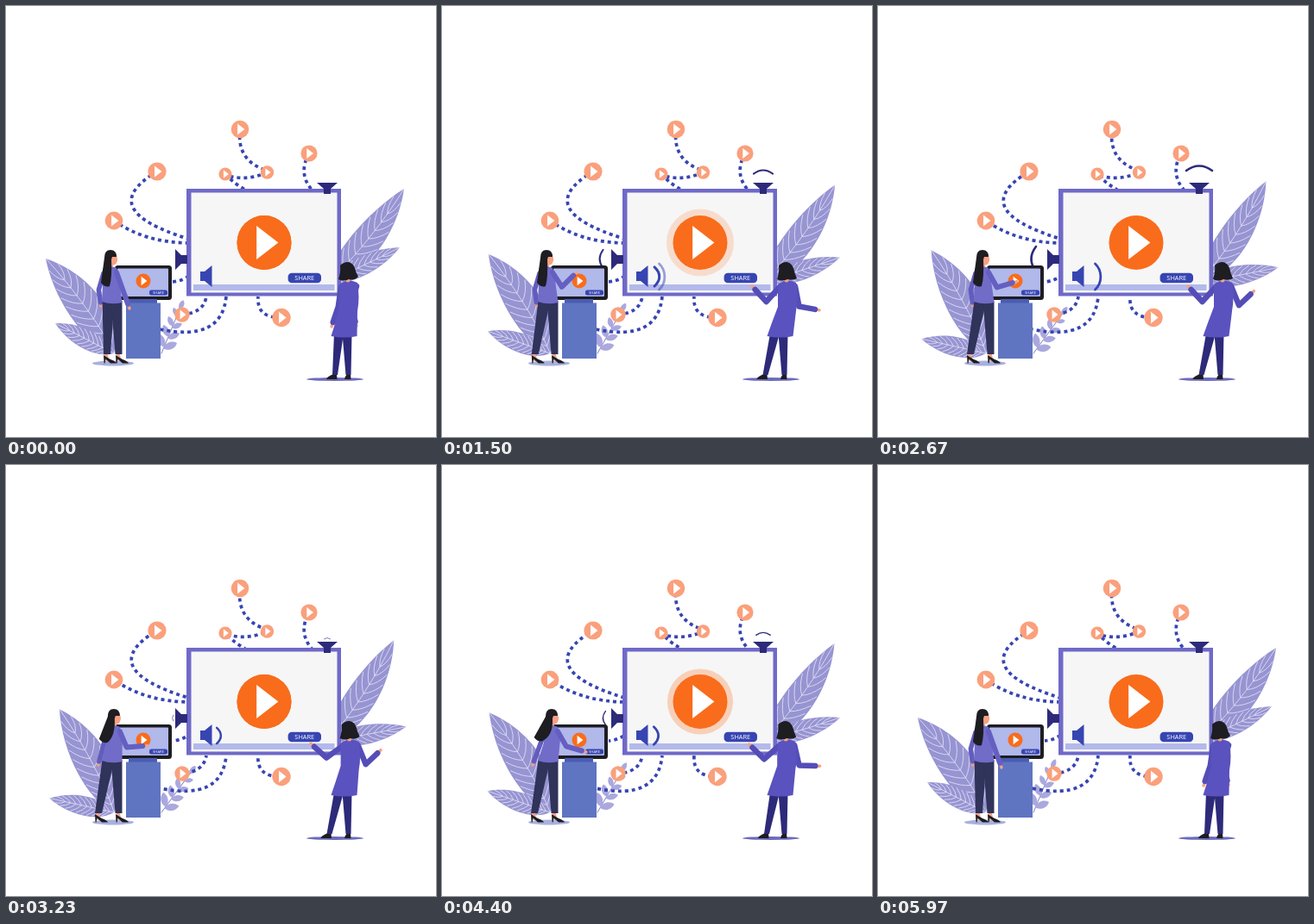
Recreate the animation shown at these times as an HTML page. Size 498x500 px, loop 6.01 s.

```html
<!DOCTYPE html>
<html lang="en">
<head>
<meta charset="utf-8">
<title>Video sharing</title>
<style>
html, body { margin: 0; width: 100%; height: 100%; overflow: hidden; background: #fff; }
svg { display: block; width: 498px; height: 500px; }
text { font-family: "Open Sans", sans-serif; fill: #fff; text-anchor: middle; }
</style>
</head>
<body>
<svg id="stage" viewBox="0 0 498 500" xmlns="http://www.w3.org/2000/svg"></svg>
<script>
const LOOP = 6010;
const BLUE = '#3745b2', NAVY = '#2d2a7a', BLACK = '#1d1d22', ORANGE = '#f96c1b', SKIN = '#f7a182';
const stage = document.getElementById('stage');

const ramp = (v, a, b) => Math.min(1, Math.max(0, (v - a) / (b - a)));
const ease = (v, a, b) => { const u = ramp(v, a, b); return u * u * (3 - 2 * u); };
const hold = (t, a, b, c, d) => ease(t, a, b) * (1 - ease(t, c, d));
const mix = (a, b, k) => a + (b - a) * k;
const mixPoint = (p, q, k) => [mix(p[0], q[0], k), mix(p[1], q[1], k)];
const scaleAt = (x, y, s) => `translate(${x} ${y}) scale(${s}) translate(${-x} ${-y})`;
const path = (d, fill) => `<path d="${d}" fill="${fill}"/>`;
const line = (d, color, width) =>
  `<path d="${d}" fill="none" stroke="${color}" stroke-width="${width}" stroke-linecap="round" stroke-linejoin="round"/>`;

function playButton(x, y, r, color) {
  return `<circle cx="${x}" cy="${y}" r="${r}" fill="${color}"/>` +
    path(`M${x - r * .28} ${y - r * .62}L${x + r * .52} ${y}L${x - r * .28} ${y + r * .62}Z`, '#fff');
}

function shareButton(x, y, w, h, size) {
  return `<rect x="${x - w / 2}" y="${y - h / 2}" width="${w}" height="${h}" rx="${h * .38}" fill="${BLUE}"/>` +
    `<text x="${x}" y="${y + size * .36}" font-size="${size}">SHARE</text>`;
}

// Grows from its base toward -y; veins end on the curved outline.
function leafShape(len, width, bend) {
  const bez = (u, a, b, c) => 3 * u * (1 - u) ** 2 * a + 3 * u * u * (1 - u) * b + u ** 3 * c;
  const at = (u, side) => [bez(u, side + bend, side + bend, 0), -len * bez(u, .2, .66, 1)];
  const curve = side => `C${side + bend} ${-len * .2} ${side + bend} ${-len * .66} 0 ${-len}`;
  let veins = 'M0 0' + curve(0);
  for (let u = .1; u < .8; u += .075) {
    for (const side of [-width, width]) {
      veins += `M${at(u, 0)}Q${at(u + .04, side * .5)} ${at(u + .13, side * .92)}`;
    }
  }
  const back = `C${width + bend} ${-len * .66} ${width + bend} ${-len * .2} 0 0Z`;
  return path('M0 0' + curve(-width) + back, '#9794d2') +
    `<path d="${veins}" fill="none" stroke="#e4e3f6" stroke-width=".75"/>`;
}

function sprigShape() {
  const leaf = (y, angle, s) =>
    `<path transform="translate(0 ${y}) rotate(${angle}) scale(${s})" d="M0 0C-6 -5 -5 -13 0 -17C5 -13 6 -5 0 0" fill="#aaa8de"/>`;
  let out = line('M0 0V-60', '#8e8bcd', 1);
  for (let i = 0; i < 4; i++) {
    out += leaf(-8 - i * 13, -45, 1 - i * .13) + leaf(-6 - i * 13, 45, 1 - i * .13);
  }
  return out + leaf(-55, 0, .7);
}

const plants = [
  { base: [125, 403], tip: [46, 293], swing: 8, width: 27, bend: 6 },
  { base: [125, 403], tip: [57, 368], swing: -15, width: 15, bend: 0 },
  { base: [370, 322], tip: [461, 212], swing: -6, width: 23, bend: 7 },
  { base: [372, 320], tip: [456, 280], swing: 15.5, width: 15, bend: 1 },
  { base: [180, 403], tip: [206, 340], swing: 14 }
];
for (const p of plants) {
  const dx = p.tip[0] - p.base[0], dy = p.tip[1] - p.base[1];
  p.angle = Math.atan2(dx, -dy) * 180 / Math.PI;
  p.shape = p.width ? leafShape(Math.hypot(dx, dy), p.width, p.bend) : sprigShape();
}

// Every floating button hangs on one dotted curve.
const floats = [
  { x: 271, y: 143, r: 10.3, trail: 'Q267 177 297 189' },
  { x: 351, y: 171, r: 9.6, trail: 'Q338 194 354 213' },
  { x: 175, y: 192, r: 10.6, trail: 'Q101 236 211 270' },
  { x: 125, y: 249, r: 10.4, trail: 'Q160 274 211 275' },
  { x: 254, y: 195, r: 7.6, trail: 'Q264 206 277 213' },
  { x: 302.5, y: 193, r: 7.7, trail: 'Q278 204 254 196' },
  { x: 204, y: 358, r: 8.7, trail: 'Q229 356 232 337' },
  { x: 319, y: 361.5, r: 10.7, trail: 'Q290 362 292 337' }
];
const cables = 'M255 337Q250 390 178 375M193 320Q204 319 212 313';

stage.innerHTML = `
<rect width="498" height="500" fill="#fff"/>
${plants.map(p => `<g class="plant">${p.shape}</g>`).join('')}
<path id="trails" d="${floats.map(f => `M${f.x} ${f.y}${f.trail}`).join('') + cables}"
  fill="none" stroke="${BLUE}" stroke-width="3.7" stroke-dasharray="4 4"/>
${floats.map(f => playButton(f.x, f.y, f.r, '#faa07c')).join('')}
<rect x="209" y="212" width="179" height="124.5" fill="#6f69c8"/>
<rect x="214.5" y="216.5" width="169" height="116" fill="#f6f6f6"/>
<rect x="217" y="323" width="163.5" height="7" fill="#b3b9ea"/>
${path('M196 282L203 289H210V299H203L196 306Z', NAVY)}
${path('M360 205H384L376 212V218H368V212Z', NAVY)}
<g id="topBeam">${line('M357 191Q372 180 387 191', NAVY, 2.6)}</g>
<g id="sideBeam">${line('M183 279Q172 293.5 183 308', NAVY, 2.6)}</g>
<circle id="halo" cx="299" cy="274.5" fill="${ORANGE}"/>
${playButton(299, 274.5, 31.5, ORANGE)}
${path('M225 308H230L238.5 301V326L230 319H225Z', BLUE)}
<g id="innerWave">${line('M243 306C248.500 311 248.500 317 243 322', BLUE, 2.2)}</g>
<g id="outerWave">${line('M251.500 299C260 307 260 321 251.500 329', BLUE, 2.8)}</g>
<g id="share">${shareButton(345.8, 315.5, 38.4, 11.5, 7.4)}</g>
<rect x="126" y="301" width="66" height="40" rx="3.5" fill="${BLACK}"/>
<rect x="129" y="304.5" width="59" height="32.5" rx="1" fill="#b1b8ea"/>
${playButton(159, 319, 8.5, ORANGE)}
${shareButton(176.5, 332.6, 21, 6, 4.2)}
<rect x="142" y="340" width="33" height="5" fill="#4a5db2"/>
<rect x="139" y="344.5" width="40" height="64.5" fill="#5f75c1"/>
<ellipse cx="124" cy="414.5" rx="24" ry="3" fill="#a9b0de"/>
<ellipse cx="381" cy="433" rx="33" ry="2" fill="#6d6bbc"/>
<g id="presenter"></g>
<g id="viewer"></g>`;

const get = id => document.getElementById(id);
const set = (id, name, value) => get(id).setAttribute(name, value);
const plantNodes = document.querySelectorAll('.plant');

// Two-bone arm: the elbow follows from the shoulder and the hand.
function arm(shoulder, hand, upper, lower, side, color, width) {
  const dx = hand[0] - shoulder[0], dy = hand[1] - shoulder[1], dist = Math.hypot(dx, dy);
  const along = Math.min(upper, (upper ** 2 - lower ** 2 + dist ** 2) / (2 * dist));
  const out = side * Math.sqrt(Math.max(0, upper ** 2 - along ** 2));
  const elbow = [shoulder[0] + (dx * along - dy * out) / dist, shoulder[1] + (dy * along + dx * out) / dist];
  const cuff = mixPoint(elbow, hand, .78);
  return line(`M${cuff}L${hand}`, SKIN, 3.4) + line(`M${shoulder}L${elbow}L${cuff}`, color, width);
}

const leg = (x, y, w, fx, fy, fw, color) =>
  path(`M${x - w / 2} ${y}H${x + w / 2}L${fx + fw / 2} ${fy}H${fx - fw / 2}Z`, color);

const heel = (x, y) =>
  line(`M${x + 3} ${y - 4}l1 6`, SKIN, 4) +
  path(`M${x} ${y - 3}l.6 9.5h1l.8 -5l5.6 5h7q-1 -2.500 -7 -4.500l-5 -3z`, BLACK);

function drawPresenter(t) {
  const lean = hold(t, 2700, 3700, 3900, 5970);
  const step = hold(t, 0, 1800, 5000, 5950);
  const x = 121 + 7 * lean, y = 292, foot = 113 - 10 * step;
  const hairX = 115 - 4 * lean, hairY = 325 - 6 * lean;
  const touch = mixPoint([155, 307], [167, 333], ease(t, 900, 4500));
  const frontHand = mixPoint([143, 351], touch, hold(t, 0, 600, 5100, 5900));
  const trousers = '#30335a';
  return heel(foot, 408) + heel(127, 408) +
    arm([x - 8, 310], [110 - 6 * lean, 348], 20, 19, 1, '#625dbd', 5.5) +
    leg(118.5, 342, 14, foot + 4, 404, 8, trousers) +
    leg(128, 342, 13, 130.5, 404, 8, trousers) +
    line(`M${x + 1} ${y + 5}L${x} 304`, SKIN, 5) +
    `<ellipse cx="${x + 3.5}" cy="${y + 2}" rx="4.6" ry="6.5" fill="${SKIN}"/>` +
    path(`M${x - 9} 305Q${x} 300 ${x + 7} 304L${x + 10} 318L134.500 344Q122 347 111 343L${x - 9} 322Z`, '#716cc8') +
    path(`M${x + 7} ${y - 1}Q${x + 7} ${y - 9} ${x} ${y - 9}Q${x - 7} ${y - 9} ${x - 7} ${y}L${hairX - 5} ${hairY - 4}Q${hairX} ${hairY + 2} ${hairX + 5} ${hairY}Q${x + 2} 314 ${x + 1} ${y + 2}L${x + 2} ${y - 1}Z`, BLACK) +
    arm([x + 7, 309], frontHand, 20, 24, 1, '#655fc2', 6);
}

function drawViewer(t) {
  const press = hold(t, 2900, 3600, 3800, 4700);
  const turn = Math.max(1 - ease(t, 0, 600), press, ease(t, 5200, 5900));
  const step = hold(t, 300, 1500, 3900, 5500);
  const x = 399 - 3 * turn, y = 308, foot = 377 - 6.5 * step;
  const pointing = [359 - 13 * press, 325 - 4 * press];
  const leftHand = mixPoint([377, 372], pointing, hold(t, 0, 930, 5070, 5930));
  const raise = hold(t, 630, 2200, 4000, 5000);
  const swing = 1.36 * raise, reach = 46 - 19 * raise ** 2;
  const rightHand = [x + 10 + Math.sin(swing) * reach, 325 + Math.cos(swing) * reach];
  const coat = '#5a52be', sleeve = '#554db7';
  const shoe = (sx, w) => path(`M${sx - w} 433Q${sx - w} 430.500 ${sx} 427h4l.5 6z`, BLACK);
  return shoe(foot + 2, 8) + shoe(395, 3) +
    leg(385.5, 380, 11, foot + 4, 428, 6, NAVY) + leg(395, 380, 11, 396.5, 428, 6, NAVY) +
    arm([x + 10, 325], rightHand, 24, 24, 1, sleeve, 6.5) +
    arm([x - 8, 326], leftHand, 23, 24.5, -1, sleeve, 6.5) +
    path(`M${x - 10} 323Q${x} 315 ${x + 11} 321Q${x + 14} 338 ${x + 11} 354L406.500 383Q392 386 376.500 383Q382 367 ${x - 10} 349Z`, coat) +
    line(`M${x} ${y + 6}V318`, SKIN, 5) +
    path(`M${x - 11} ${y + 9}Q${x - 8} ${y} ${x - 9} ${y - 7}Q${x - 5} ${y - 11} ${x} ${y - 11}Q${x + 6} ${y - 10} ${x + 8} ${y - 4}Q${x + 9} ${y + 1} ${x + 12} ${y + 8 - 2 * turn}Q${x + 7} ${y + 11} ${x + 1} ${y + 9}Q${x - 5} ${y + 12} ${x - 11} ${y + 9}Z`, BLACK);
}

function render(t) {
  const sway = (1 - Math.cos(2 * Math.PI * t / LOOP)) / 2;
  plants.forEach((p, i) => plantNodes[i].setAttribute('transform',
    `translate(${p.base}) rotate(${p.angle + p.swing * sway})`));
  set('trails', 'stroke-dashoffset', -96 * t / LOOP);

  const beat = t % (LOOP / 6);
  set('innerWave', 'transform', scaleAt(235, 314, 1 + .38 * ramp(beat, 60, 500)));
  set('innerWave', 'opacity', ramp(beat, 20, 130) * (1 - ramp(beat, 560, 650)));
  set('outerWave', 'opacity', ramp(beat, 450, 550) * (1 - ramp(beat, 670, 755)));
  const grow = ramp(beat, 100, 640);
  const beamAlpha = ramp(beat, 100, 200) * (1 - ramp(beat, 675, 715));
  set('topBeam', 'transform', scaleAt(372, 205, grow));
  set('sideBeam', 'transform', scaleAt(197, 293.5, grow));
  set('topBeam', 'opacity', beamAlpha);
  set('sideBeam', 'opacity', beamAlpha);

  const half = t % (LOOP / 2), pulse = ramp(half, 690, 1770);
  set('halo', 'r', 31.5 + 10 * pulse);
  set('halo', 'opacity', (1 - pulse) ** 1.2);
  set('share', 'transform', scaleAt(345.8, 315.5, 1 + .05 * hold(half, 670, 730, 760, 1000)));

  get('presenter').innerHTML = drawPresenter(t);
  get('viewer').innerHTML = drawViewer(t);
}

function tick() {
  render(performance.now() % LOOP);
  requestAnimationFrame(tick);
}
tick();
</script>
</body>
</html>
```
